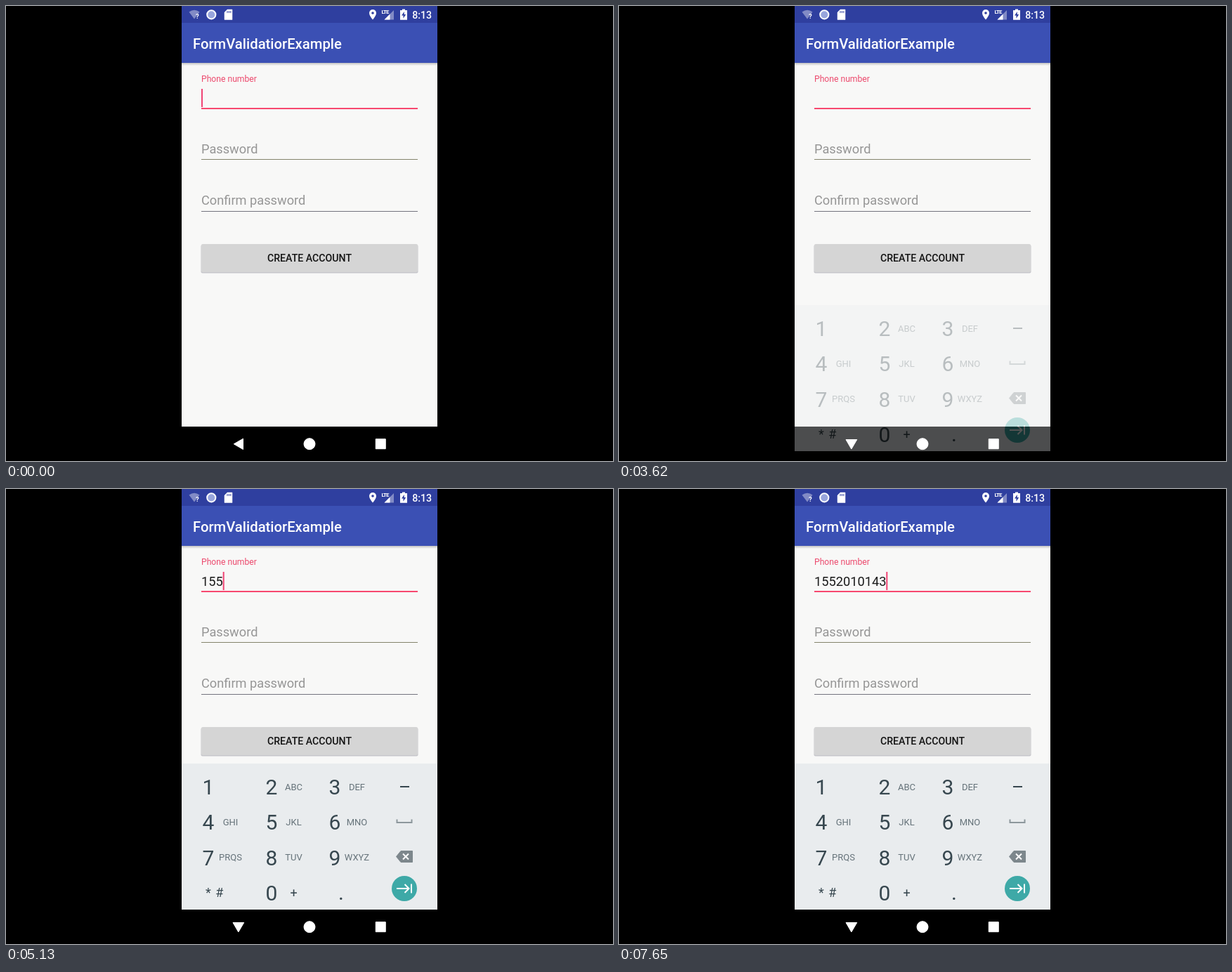
An HTML page that plays this animation: 864 px wide and 648 px high, repeating every 8000 ms.

```html
<!DOCTYPE html>
<html lang="en">
<head>
<meta charset="utf-8">
<title>Form validation</title>
<style>
  html, body { margin: 0; width: 100%; height: 100%; overflow: hidden; background: #000; }
  svg { display: block; width: 100%; height: 100%; font-family: Roboto, "Noto Sans", sans-serif; }
  .field { font-size: 18.225px; fill: #969696; }
  .digit, .abc, .sym { text-anchor: middle; fill: #37474f; }
  .digit { font-size: 30px; }
  .abc { font-size: 13px; fill: #66737a; }
  .sym { font-size: 18px; }
</style>
</head>
<body>
<svg viewBox="0 0 864 648">
  <defs>
    <linearGradient id="shade" x2="0" y2="1">
      <stop offset="0" stop-opacity=".22"/>
      <stop offset="1" stop-opacity="0"/>
    </linearGradient>
  </defs>
  <rect width="864" height="648"/>
  <rect x="250" width="364" height="599" fill="#f8f8f7"/>
  <rect x="250" y="81" width="364" height="4" fill="url(#shade)"/>
  <rect x="250" width="364" height="81" fill="#3b50b4"/>
  <rect x="250" width="364" height="24" fill="#2f3f9f"/>
  <text x="266" y="60.8" font-size="20.25" font-weight="500" fill="#fff">FormValidatiorExample</text>

  <!-- status bar -->
  <g fill="#fff">
    <path d="M260.5 8.5Q268 3 275.5 8.5L268 18.5Z" opacity=".4"/>
    <text x="270" y="18" font-size="9.5" font-weight="700">?</text>
    <circle cx="292.3" cy="12.3" r="6.1" fill="#98a5dc" stroke="#fff" stroke-width="2"/>
    <path d="M315 5H322V19.500H311V9Z" stroke="#fff" stroke-width=".5" stroke-linejoin="round"/>
    <path d="M315 7v3M317.400 7v3M319.800 7v3" stroke="#2f3f9f"/>
    <path d="M522 5a5 5 0 0 1 5 5Q527 13.500 522 19.500 517 13.500 517 10A5 5 0 0 1 522 5Z"/>
    <circle cx="522" cy="10" r="1.800" fill="#2f3f9f"/>
    <text x="534.500" y="11" font-size="7.800" font-weight="700" letter-spacing="-.9">LTE</text>
    <path d="M552 6V19.500H538.500Z" opacity=".4"/>
    <path d="M546.500 11.500V19.500H538.500Z"/>
    <path d="M564 4.500h4v1.500h3V19.700H561V6h3Z"/>
    <path d="M566.800 8 563 13.600H565.500V17.800L569.200 12H566.800Z" fill="#2f3f9f"/>
    <text x="578.200" y="17.600" font-size="14.175" font-weight="500">8:13</text>
  </g>

  <!-- form -->
  <text x="278" y="108.300" font-size="12.150" fill="#ec4b6e">Phone number</text>
  <rect x="278" y="145" width="308" height="2" fill="#f7486f"/>
  <text class="field" id="phone" x="278" y="138.300" style="fill:#1c1c1c"></text>
  <rect id="caret" y="118" width="2" height="26" fill="#f04474"/>
  <text class="field" x="278" y="210.200">Password</text>
  <rect x="278" y="218" width="308" height="1" fill="#84846c"/>
  <text class="field" x="278" y="283.400">Confirm password</text>
  <rect x="278" y="292" width="308" height="1" fill="#74747e"/>
  <rect x="277.500" y="340" width="309" height="40.500" rx="2" fill="#c6c6cb"/>
  <rect x="278" y="339" width="308" height="40" rx="2" fill="#d5d5d5"/>
  <text x="432" y="364" text-anchor="middle" font-size="14.175" font-weight="500" fill="#141414">CREATE ACCOUNT</text>

  <!-- keypad -->
  <g id="pad">
    <rect x="250" y="391" width="364" height="208" fill="#e9ecee"/>
    <rect id="lit" y="398" width="90" height="50" fill="#d6dcde"/>
    <g id="keys"></g>
    <rect x="561" y="423" width="13" height="2" fill="#37474f"/>
    <path d="M556.500 470.500V475H577.500V470.500" fill="none" stroke="#8d979c" stroke-width="2"/>
    <path d="M562 515.500H578.500V531.500H562L555.500 523.500Z" fill="#7d878c" stroke="#7d878c" stroke-linejoin="round"/>
    <path d="M565 519.500 573 527.500M573 519.500 565 527.500" stroke="#fff" stroke-width="2"/>
    <circle cx="567" cy="569" r="18" fill="#3ea9a7"/>
    <path d="M556 569H573M567.500 563 573.500 569 567.500 575M577 562.500V575.500" fill="none" stroke="#fff" stroke-width="2"/>
  </g>

  <!-- navigation -->
  <g fill="#fff" stroke="#fff" stroke-linejoin="round">
    <path id="back"/>
    <circle cx="432" cy="623.700" r="8"/>
    <rect x="526.250" y="616.700" width="14" height="14"/>
  </g>
</svg>
<script>
const $ = id => document.getElementById(id);
const set = (id, attrs) => {
  for (const name in attrs) $(id).setAttribute(name, attrs[name]);
};
const LOOP = 8000, BLINK = 504, ADVANCE = 10.23;
const SLIDE = { open: 3520, start: 3570, length: 460, depth: 42 };

// Digits typed in a row; a key, if given, lights up shortly before the first.
const bursts = [
  { text: '155', start: 4930, gap: 100, key: 1 },
  { text: '2010', start: 6040, gap: 133, key: 2 },
  { text: '14', start: 7250, gap: 100 },
  { text: '3', start: 7650, gap: 100, key: 3 }
];
const edits = bursts.flatMap(b =>
  [...b.text].map((digit, i) => ({ digit, time: b.start + i * b.gap })));
const litKey = t => bursts.find(b => b.key &&
  t >= b.start - 100 && t < b.start + (b.text.length - 1) * b.gap)?.key;

const label = (cls, x, y, s) => `<text class="${cls}" x="${x}" y="${y}">${s}</text>`;
$('keys').innerHTML = ' ABC DEF GHI JKL MNO PRQS TUV WXYZ'.split(' ').map((s, i) => {
  const x = 288 + 90 * (i % 3), y = 435.2 + 50.2 * Math.floor(i / 3);
  return label('digit', x, y, i + 1) + label('abc', x + 31.5, y - 6.6, s);
}).join('') +
  label('digit', 378, 585.8, 0) + label('digit', 477, 585, '.') +
  label('sym', 288, 581.3, '*') + label('sym', 303.7, 581.3, '#') + label('sym', 409.5, 581.3, '+');

function drawText(t) {
  const done = edits.filter(e => e.time <= t);
  const since = done.length ? done.at(-1).time : -103;
  $('phone').textContent = done.map(e => e.digit).join('');
  set('caret', {
    x: 278 + ADVANCE * done.length,
    opacity: Math.floor((t - since) / BLINK) % 2 ? 0 : 1
  });
}

function drawPad(t) {
  const key = litKey(t);
  const tick = Math.floor((t - 20) / 100) * 100 + 20; // the slide moves ten times a second
  const left = 1 - Math.min(1, Math.max(0, (tick - SLIDE.start) / SLIDE.length));
  set('lit', { x: 162 + 90 * (key || 1), opacity: key ? 1 : 0 });
  set('pad', {
    transform: `translate(0 ${Math.round(SLIDE.depth * left ** 1.5)})`,
    opacity: 1 - left ** 3.4
  });
  set('back', {
    d: t < SLIDE.open ? 'M337.5 616.2V631.5L324.3 623.8Z' : 'M323 617.5H338.7L330.8 631Z'
  });
}

function draw(t) {
  drawText(t);
  drawPad(t);
}

const begin = performance.now();
function loop() {
  draw((performance.now() - begin) % LOOP);
  requestAnimationFrame(loop);
}
loop();
</script>
</body>
</html>
```
